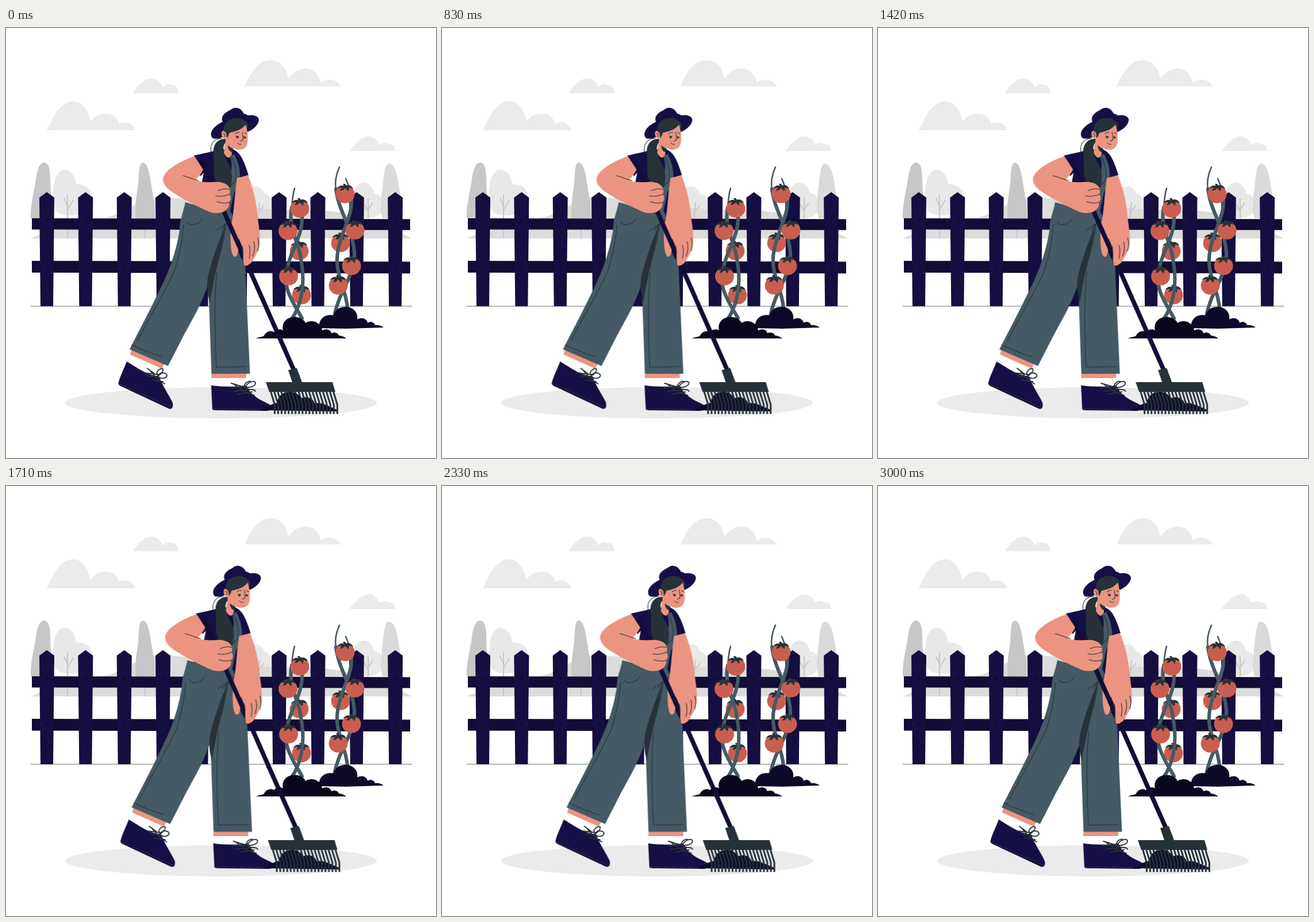
Animation, 748 px wide and 748 px high, one loop 3040 ms. Source, as an HTML page:

```html
<!DOCTYPE html>
<html lang="en">
<head>
<meta charset="utf-8">
<title>Gardener raking</title>
<style>
  html, body { margin: 0; width: 100%; height: 100%; overflow: hidden; background: #fff; }
  svg { display: block; width: 100vw; height: 100vh; }
  .navy { fill: #160f45; }
  .post { fill: #150e40; }
  .rail { fill: #120c36; }
  .dark { fill: #263238; }
  .cloth { fill: #455a64; }
  .skin { fill: #eb9481; }
  .soil { fill: #0d0a29; }
  .deep { fill: #09071d; }
  .cloud, .leaf { fill: #ebebeb; }
  .leaf { fill: #e8e8e8; }
  .grey { fill: #c7c7c7; }
  .line { fill: none; stroke: #263238; stroke-width: 1.1; stroke-linecap: round; stroke-linejoin: round; }
  .ground { stroke-width: .7; }
  .lace { fill: none; stroke: #263238; stroke-width: 1.9; stroke-linecap: round; }
  .bark { fill: none; stroke: #c7c7c7; stroke-width: 2; }
  .vine { fill: none; stroke: #455a64; stroke-width: 6.2; stroke-linecap: round; }
  .tip { stroke-width: 2.6; }
  #gardener { animation: shake 3040ms linear infinite; }
  /* 3 s shake, entered 25 ms in */
  @keyframes shake {
    0% { transform: translateX(-.13px); }
    9.05%, 87.99% { transform: translateX(-1.5px); }
    18.91%, 78.13% { transform: translateX(3px); }
    28.78%, 48.52%, 68.26% { transform: translateX(-6px); }
    38.65%, 58.39% { transform: translateX(6px); }
    97.86% { transform: translateX(0); }
    100% { transform: translateX(-.2px); }
  }
</style>
</head>
<body>
<svg viewBox="0 0 748 748">
  <defs>
    <g id="tomato">
      <ellipse rx="16.400" ry="15.800" fill="#c95e50"/>
      <path class="dark" d="M-15-9C-11-15-6-16-2-14L-4-18L0-18L2-15C6-17 12-15 14-9C10-11 8-11 6-11C7-8 6-6 5-5C3-8 1-10-1-10C-3-7-6-6-9-6C-8-8-7-10-6-11C-9-11-12-11-15-9Z"/>
    </g>
  </defs>

  <g class="cloud">
    <path d="M71 178C82 152 97 127 117 127.500C135 128 144 147 147 162.500C155 152 165 149 174 149C187 149 193 156 197 166.500C210 160 221 167 225 178Z"/>
    <path d="M221 113.500C228 101 240 88 252 88C264 88 270 96 272 103C278 96 286 97 288 100C295 97 300 105 300 113.500Z"/>
    <path d="M415 101.500C424 80 438 56 460 56C479 56 489 72 491 87C501 76 511 70.500 521 70.500C537 70.500 545 83 548 95C558 87 573 87 583 101.500Z"/>
    <path d="M598 214C606 202 618 188.500 630 188.500C641 188.500 647 196 649 203.500C656 198 664 199 666 203C673 200 677 207 677 214Z"/>
  </g>

  <path class="leaf" d="M103 247C91 246 83 260 83 280C77 300 82 326 107 326C138 328 153 313 151 297C150 283 142 271 122 272C120 257 114 248 103 247Z"/>
  <path class="leaf" d="M420 281C432 271 446 276 449 288C461 290 466 305 463 331H420Z"/>
  <path class="leaf" d="M623 269C610 268 604 281 604 296C596 306 600 331 628 331C654 331 660 311 655 300C652 290 645 288 640 288C638 277 633 270 623 269Z"/>
  <path fill="#dadada" d="M666 236C658 237 657 258 655 276C652 300 650 322 656 331H688C687 314 687 301 685 285C682 266 679 236 666 236Z"/>
  <path fill="#dcdcdc" d="M43 366C90 346 140 340 185 327C220 312 235 296 270 295C320 296 360 302 400 308C470 322 545 311 590 323C640 340 680 351 706 366Z"/>
  <path class="grey" d="M67 234C56 233 53 254 51 270C47 292 42 312 43 331H81C82 315 81 302 78 285C76 267 80 236 67 234Z"/>
  <path class="grey" d="M238 234C229 235 232 260 229 279C225 300 223 331 228 342C235 349 252 347 257 339C260 320 258 304 255 287C251 265 249 235 238 234Z"/>
  <path class="bark" d="M107 366V290M107 317L117 299M107 310L101 296M438 331L441 303M438 322L449 308M630 331V296M630 316L638 304M630 319L623 307M242 366V300M242 320L249 309"/>

  <path class="rail" d="M45 331L703 332.500V351.500L45 350.500ZM45 405L703 406.500V427L45 425.500Z"/>
  <g id="posts" class="post"></g>
  <path class="line ground" d="M43 484H706"/>
  <ellipse class="cloud" cx="374" cy="652" rx="271" ry="27"/>

  <g id="backFruit"></g>
  <path class="vine" d="M497 312C490 352 510 372 513 402C520 440 517 475 498 505M515 325C517 362 494 388 489 420C480 452 500 478 515 505M574 280C578 318 602 345 606 390C608 430 580 455 571 501M600 290C606 325 584 348 577 390C571 428 591 450 594 487"/>
  <path class="vine tip" d="M502 279C498 292 498 304 497 312M580 242C573 258 572 270 574 280M591 262C595 272 599 280 600 290"/>
  <g id="frontFruit"></g>

  <path class="soil" d="M528 518C534 517 540 516 545 515C546 505 557 497 570 500C572 490 580 485 591 485C604 485 613 495 611 507C619 502 628 506 629 513C634 509 641 512 642 517C648 516 653 518 657 521L592 523L540 522Z"/>
  <path class="deep" d="M435 540C440 537 446 538 449 535C452 528 461 525 466 529C470 524 478 523 482 526C478 512 490 502 503 502.500C512 503 518 507 521 513C534 505 549 514 550 526C557 522 565 525 566 531C572 528 578 531 579 535C584 535 590 538 592 540Z"/>

  <g id="gardener">
    <!-- legs and shoes -->
    <path fill="#fff" d="M217 566L271 590L265 610L209 586ZM357 607H418V626H357Z"/>
    <path class="skin" d="M219 557L276 583L271 592.500L216 568ZM358 599H418V609H357Z"/>
    <path class="navy" d="M210 580C206 592 199 604 195.500 618C196 622 200 623 204 625L283 662C291 665 291 656 290 652C283 637 272 622 266 605C250 607 225 589 210 580Z"/>
    <path class="navy" d="M357 621.500C370 624 404 625 418 621.500C425 638 440 646 455 653C464 657 467 664 455 666L370 665C361 665 359 665 359 662Z"/>
    <path class="line" d="M197 619L286 659M360 662.500L457 664"/>
    <path class="lace" d="M246 592L258 601M242 600L265 603M247 605L270 609M254 612L273 615M249 594C260 608 266 613 276 619M265 605C268 597 279 600 280 604C281 609 270 612 265 606M264 604C259 598 270 590 273 593C275 597 268 604 264 605"/>
    <path class="lace" d="M392 618L412 624M391 626L420 625M396 632L424 629M404 637L428 633M397 620C411 632 421 635 432 639M416 625C422 614 433 613 434 617C435 623 424 626 416 625M417 626C423 631 434 627 434 632M416 625C412 619 422 613 426 615"/>

    <!-- shirt, neck, overalls -->
    <path class="navy" d="M327 222C340 219 358 215 373 211H394C406 215 413 226 422 256L402 262L398 335H370L341 267Z"/>
    <path class="skin" d="M382 190L379 217C386 232 394 224 393 216L396 205Z"/>
    <path class="dark" d="M386 204C389 207 393 209 396 210L393 216C389 215 386 210 386 204Z"/>
    <path class="cloth" d="M390 223L397 219C403 231 408 244 407 262C400 285 398 305 397 335L366 342L384 268C393 254 395 238 390 223Z"/>
    <path class="line" d="M393 225C400 240 402 254 399 266C395 271 390 273 388 278"/>
    <path class="cloth" d="M312 303L340 311L381 319H397C399 345 401 370 404 388C407 398 411 403 416 410L424.500 601.500H357.500L353 470L351 448C339 485 319 515 303 547L282 588L215 559C236 518 256 480 274 442C289 410 298 378 302 352C302 333 309 320 312 303Z"/>
    <path class="dark" d="M382 342C373 364 358 404 352 430C348 449 351 465 355 478C359 440 373 400 382 342Z"/>
    <path class="line" d="M309 342C307 365 304 390 293 423C277 460 251 500 229 544M219 551C235 559 253 566 271 572M367 425C362 470 363 540 366 590L418 589M316 337C319 346 336 342 342 332M365 353C374 346 385 339 393 333M374 352C379 344 382 341 386 338M383 341C381 361 375 384 370 402"/>
    <path class="navy" d="M397 285L399 282L396 330L390 318Z"/>

    <!-- far arm -->
    <path class="skin" d="M402 261L421 256C429 276 436 300 438 330C442 356 443 372 440 382C436 395 426 414 418 414C411 414 412 400 410 378L405 366C405 385 404 398 398 398C391 397 390 372 391 345C397 325 397 295 402 261Z"/>

    <!-- hat and head -->
    <path class="navy" d="M360 192C353 185 357 173 377 163C373 155 380 147 390 143C393 140 398 138 402 139C408 140 411 144 414 149C419 150 419 151 421 152C430 150 439 153 440 159C440 170 427 179 415 183L376 190C371 193 364 193 360 192Z"/>
    <path class="skin" d="M386 172L417 167C421 180 422 197 419 204C414 214 400 214 394 207C388 204 385 199 384 191C380 196 375 189 375 184C375 178 380 177 383 181Z"/>
    <path class="dark" d="M379 180C377 166 388 156 403 156.500C415 157 424 166 421 176C420 173 418 171 417 168C411 176 401 180 389 182C388 185 386 190 384 192C384 184 383 180 379 180Z"/>
    <path class="line" d="M378 183C381 184 382 187 380 189M411 181C412 186 413 191 412 195L408 197M403 200C405 203 407 203 409 202M399 184C401 182 404 181 406 182M415 182L419 184M400 188L405 189M413 189L417 190"/>
    <circle class="dark" cx="402.500" cy="190" r="2"/>
    <ellipse class="dark" cx="415.500" cy="190.500" rx="1.600" ry="2"/>

    <!-- rake -->
    <path class="soil" d="M442 665C454 660 462 653 473 652C471 641 483 632 495 633C505 633 511 639 512 645C524 638 536 646 537 653C548 650 559 657 576 664V667Z"/>
    <path d="M341 233L500 593" fill="none" stroke="#120d36" stroke-width="7.800" stroke-linecap="round"/>
    <path class="dark" d="M491 595L506 591.500L515 616H568L573 633H458L452 616H498Z"/>
    <path id="tines" fill="none" stroke="#263238" stroke-width="3"/>
    <path class="skin" d="M410 376C414 385 411 401 413 410C415 415 421 415 425 408L440 380L436 350L412 360Z"/>
    <path class="line" d="M411 379C414 390 411 402 413 410M423 378C426 386 424 395 423 401M431 372C434 381 432 391 429 397M438 365C441 374 440 382 438 388"/>

    <!-- ponytail -->
    <path class="dark" d="M382 193C368 192 360 203 361 217C362 232 362 247 362 254C364 268 376 288 391 276C396 256 391 243 387 236C379 222 375 207 382 199Z"/>
    <path class="line" d="M376 192C360 192 353 205 358 219"/>

    <!-- near arm -->
    <path fill="#fff" d="M333 263L344 252L341 268Z"/>
    <path class="skin" d="M328 223C310 229 283 242 275 257C269 269 280 280 295 289C315 302 335 311 352 319C360 323 375 323 381 318C388 313 389 308 388 304C393 297 391 293 389 289C393 280 386 271 376 269C369 266 360 269 346 268C339 268 334 266 330 264C337 257 341 251 343 246Z"/>
    <path class="line" d="M308 257C318 259 326 264 335 265M369 283C376 280 384 279 389 281M365 292C374 294 382 292 389 289M367 302C375 305 383 305 388 303"/>
  </g>
</svg>
<script>
  const get = id => document.getElementById(id);
  const range = (n, draw) => Array.from({ length: n }, (_, i) => draw(i)).join('');

  get('posts').innerHTML = range(10, i => {
    const x = 71 + i * 67.35;
    return `<path d="M${x - 13} 295L${x} 285.500L${x + 13} 295L${x + 11} 484H${x - 11}Z"/>` +
      [335, 415].map(y => `<circle class="soil" cx="${x}" cy="${y}" r="2.200"/>`).join('');
  });

  const fruit = spots => spots.map(([x, y]) => `<use href="#tomato" x="${x}" y="${y}"/>`).join('');
  get('backFruit').innerHTML = fruit([[510, 388], [514, 465], [582, 374]]);
  get('frontFruit').innerHTML = fruit([[511, 314], [490.5, 353], [491.5, 432], [590, 289], [607, 352], [601, 414], [578, 448]]);

  get('tines').setAttribute('d', range(19, i => {
    const x = 467.500 + i * 6.05;
    return `M${x - 7} 632L${x} 655V671.500`;
  }));
</script>
</body>
</html>
```
